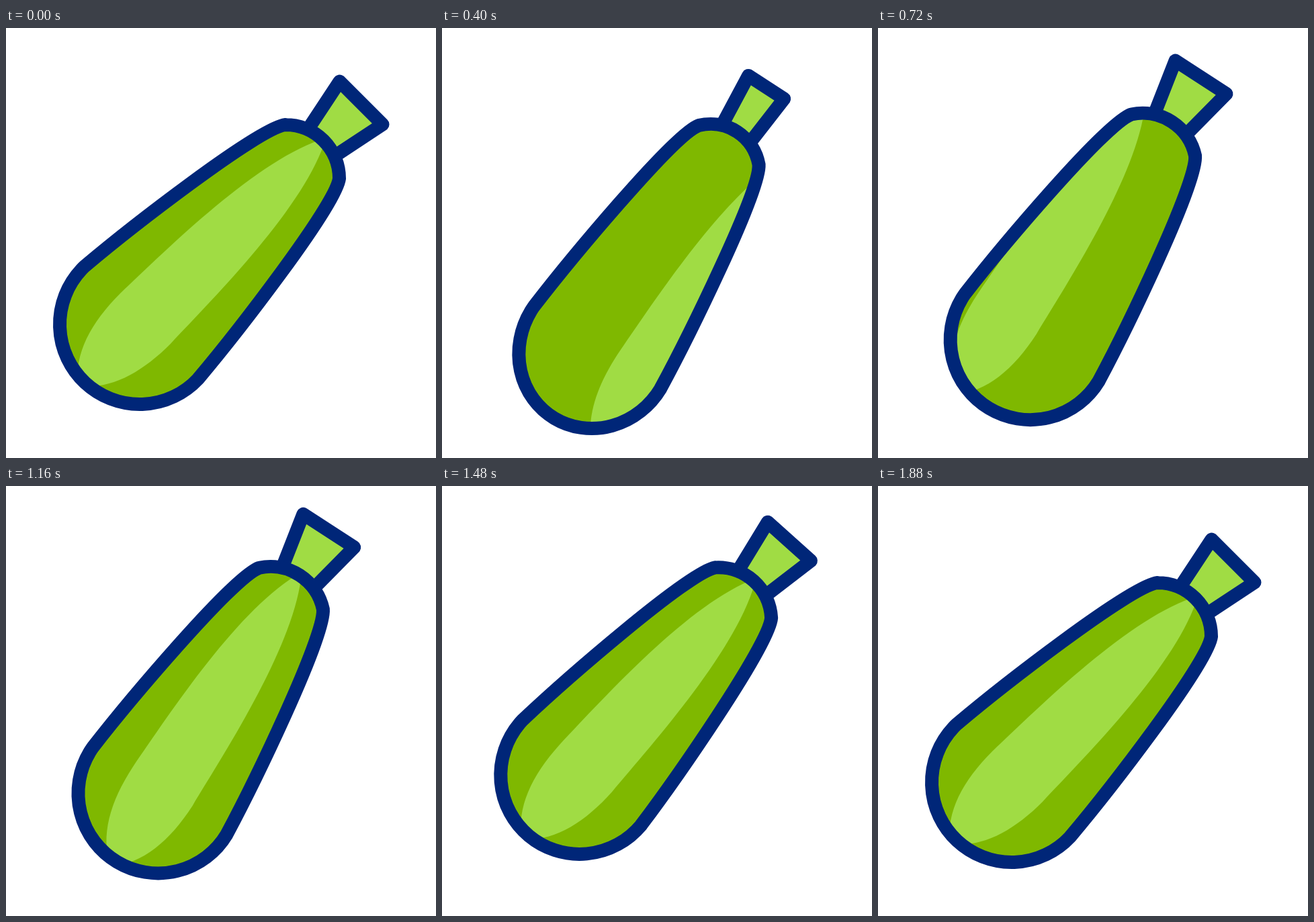
An HTML page with a canvas for the animation above (2000 ms loop, 640 px wide and 640 px high).

```html
<!DOCTYPE html>
<html lang="en">
<head>
<meta charset="utf-8">
<title>Zucchini</title>
<style>
  html, body { margin: 0; width: 100%; height: 100%; overflow: hidden; background: #fff; }
  canvas { display: block; width: 100vmin; height: 100vmin; }
</style>
</head>
<body>
<canvas id="stage" width="640" height="640"></canvas>
<script>
const ctx = document.getElementById('stage').getContext('2d');
const NAVY = '#002678', DARK = '#7fb800', LIGHT = '#a0dc44';
const LOOP = 2000, STEP = 40;

// Keys are [step, value] pairs, eased in between.
const LIFT = [[2, 0], [8, 44], [13, -37], [16, 1.5], [22, -2], [28, -2],
              [31, -18], [33, 0], [37, -18], [42, 29], [47, 0]];
const SWAY = [[2, 0], [10, 2], [16, 0], [22, -0.5], [40, 0]];
const TILT = [[2, 0], [8, -12], [31, -12], [40, 0]];
const SQUEEZE = [[4, 0], [10, 1], [16, 0], [29, 0], [33, 0.62], [39, 0]];

const clamp = x => Math.min(1, Math.max(0, x));
const smooth = x => { x = clamp(x); return x * x * (3 - 2 * x); };

function sample(keys, s) {
  let [s0, v0] = keys[0];
  for (const [s1, v1] of keys) {
    if (s < s1) return v0 + (v1 - v0) * smooth((s - s0) / (s1 - s0));
    [s0, v0] = [s1, v1];
  }
  return v0;
}

// Stripe travel across the body and the distance to the next stripe.
function spin(s) {
  if (s < 25) return { gap: 250, shift: 250 * clamp((s - 4) / 17.5) };
  return { gap: 196, shift: 196 * smooth((s - 29) / 6) };
}

// Local space: origin at the centre of the round end, stem pointing up.
function bodyPath(width) {
  ctx.save();
  ctx.scale(width, 1);
  ctx.beginPath();
  ctx.moveTo(-118.9, -4);
  ctx.bezierCurveTo(-112, -85, -82, -331, -56.6, -363.5);
  ctx.arc(0, -306.9, 80, -Math.PI * 0.75, -Math.PI * 0.25);
  ctx.bezierCurveTo(82, -331, 112, -85, 118.9, -4);
  ctx.arc(0, 0, 119, -0.034, Math.PI + 0.034);
  ctx.closePath();
  ctx.restore();
}

function stripe(x) {
  ctx.beginPath();
  ctx.moveTo(x, -392);
  ctx.bezierCurveTo(x + 50, -300, x + 50, -110, x + 53, -12);
  ctx.bezierCurveTo(x + 53, 50, x + 38, 100, x, 130);
  ctx.bezierCurveTo(x - 38, 100, x - 53, 50, x - 53, -12);
  ctx.bezierCurveTo(x - 50, -110, x - 50, -300, x, -392);
  ctx.fillStyle = LIGHT;
  ctx.fill();
}

function stem(q) {
  const far = 45.25 * (1 - 0.3 * q), near = 23.5 * (1 - 0.04 * q);
  ctx.beginPath();
  ctx.moveTo(-near, -360);
  ctx.lineTo(-far, -466);
  ctx.lineTo(far, -466);
  ctx.lineTo(near, -360);
  ctx.closePath();
  ctx.fillStyle = LIGHT;
  ctx.fill();
  ctx.stroke();
}

function draw(s) {
  const q = sample(SQUEEZE, s);
  const width = 1 - 0.055 * q;
  const { gap, shift } = spin(s);

  ctx.setTransform(1, 0, 0, 1, 0, 0);
  ctx.fillStyle = '#fff';
  ctx.fillRect(0, 0, 640, 640);

  ctx.translate(320 + sample(SWAY, s), 320 + sample(LIFT, s));
  ctx.rotate(sample(TILT, s) * Math.PI / 180);
  ctx.translate(-121, 121);
  ctx.rotate(Math.PI / 4);

  ctx.lineWidth = 20;
  ctx.lineJoin = ctx.lineCap = 'round';
  ctx.strokeStyle = NAVY;
  stem(q);

  bodyPath(width);
  ctx.fillStyle = DARK;
  ctx.fill();
  ctx.save();
  ctx.clip();
  ctx.scale(width, 1);
  stripe(shift);
  stripe(shift - gap);
  ctx.restore();

  bodyPath(width);
  ctx.stroke();
}

const start = performance.now();
function tick() {
  const t = (performance.now() - start) % LOOP;
  draw(Math.floor(t / STEP));
  requestAnimationFrame(tick);
}
tick();
</script>
</body>
</html>
```
